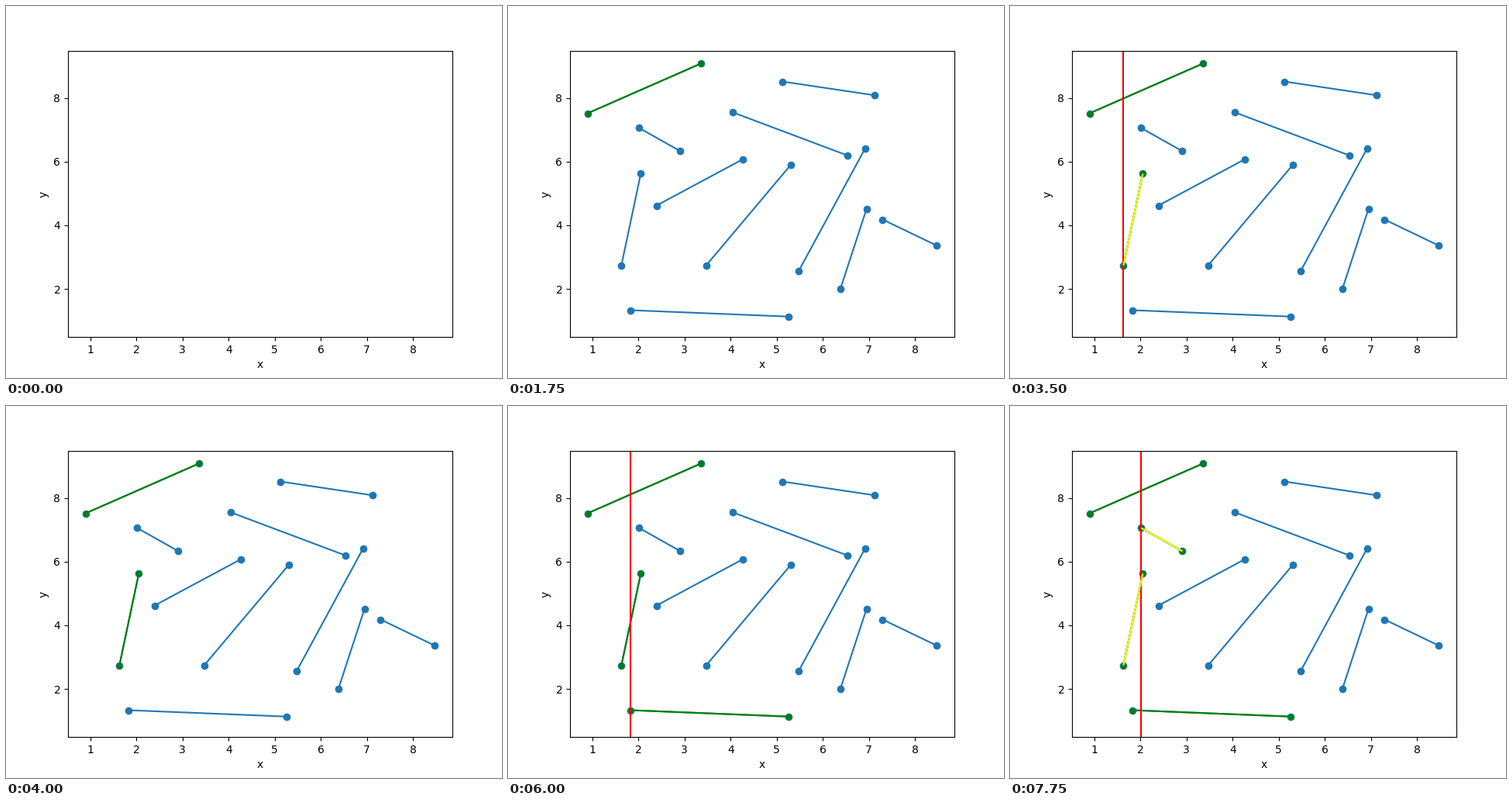
These frames come from a looping animation (640x480 px, 8 s). A matplotlib script:

```python
import matplotlib.pyplot as plt
import numpy as np
from matplotlib.animation import FuncAnimation
from matplotlib.collections import LineCollection

# Key points, sorted by left end: the order in which the sweep line meets them
SEGMENTS = [
    ((0.894, 7.52), (3.35, 9.083)),
    ((1.63, 2.74), (2.05, 5.62)),
    ((1.83, 1.33), (5.25, 1.13)),
    ((2.016, 7.06), (2.91, 6.33)),
    ((2.39, 4.62), (4.27, 6.08)),
    ((3.47, 2.74), (5.30, 5.89)),
    ((4.05, 7.55), (6.53, 6.20)),
    ((5.13, 8.52), (7.12, 8.09)),
    ((5.48, 2.57), (6.92, 6.42)),
    ((6.38, 1.99), (6.95, 4.52)),
    ((7.30, 4.18), (8.477, 3.36)),
]
ENDS = [end for segment in SEGMENTS for end in segment]
STEPS = 31
INTERVAL = 250

fig, ax = plt.subplots(figsize=(6.4, 4.8), dpi=100)
ax.set_xlabel("x")
ax.set_ylabel("y")

actions = []  # one (artist, visible) per step


def padded(low, high):
    pad = 0.05 * (high - low)
    return low - pad, high + pad


def show(artist):
    actions.append((artist, True))
    return artist


def hide(artist):
    actions.append((artist, False))


def show_segments(segments, color):
    lines = LineCollection(segments, colors=color, linewidths=1.5)
    return show(ax.add_collection(lines, autolim=False))


def show_points(points, color, size=36):
    return show(ax.scatter(*zip(*points), s=size, color=color))


def height(segment, x):
    return np.interp(x, *zip(*segment))


def neighbours(active, segment):
    """The segment and the one below it, or above it if it is the lowest."""
    x = segment[0][0]
    order = sorted(active, key=lambda s: height(s, x), reverse=True)
    top = min(order.index(segment), len(order) - 2)
    return order[top:top + 2]


def sweep(active):
    segment = active[-1]
    line = show(ax.axvline(segment[0][0], color="red"))
    show_segments([segment], "green")
    for end in segment:
        show_points([end], "green", size=20)
    if len(active) > 1:
        pair = neighbours(active, segment)
        marks = [show_segments([s], "yellow") for s in pair]
        for mark in marks:
            hide(mark)
    hide(line)


show_segments(SEGMENTS, "tab:blue")
show_points(ENDS, "tab:blue")
met = 0
while len(actions) < STEPS:
    met += 1
    sweep(SEGMENTS[:met])

# The sweep line is anchored on the diagonal, so the lowest y is the first x
xs, ys = zip(*ENDS)
ax.set_xlim(padded(min(xs), max(xs)))
ax.set_ylim(padded(min(xs), max(ys)))


def update(step):
    for artist, _ in actions:
        artist.set_visible(False)
    for artist, visible in actions[:step]:
        artist.set_visible(visible)
    return []


anim = FuncAnimation(fig, update, frames=STEPS + 1, interval=INTERVAL,
                     repeat=True, repeat_delay=0, blit=False)
plt.show()
```
